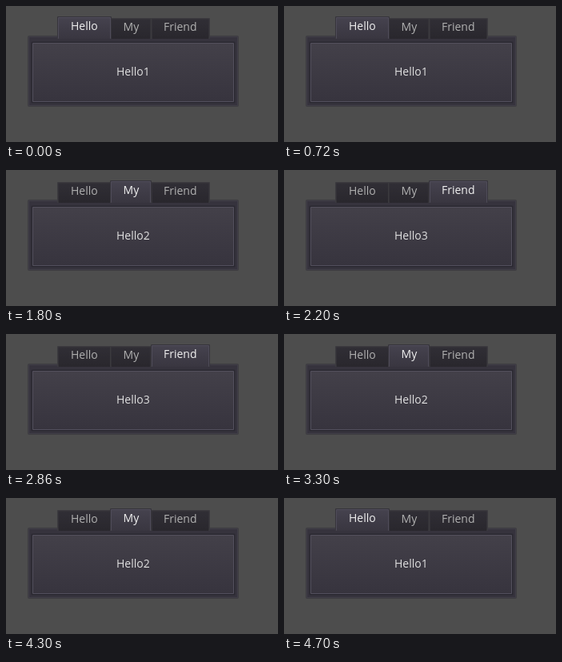
Recreate the animation shown at these times as an HTML page. Size 340x170 px, loop 5600 ms.

```html
<!DOCTYPE html>
<html lang="en">
<head>
<meta charset="utf-8">
<title>Tab container</title>
<style>
  html, body { margin: 0; width: 100%; height: 100%; overflow: hidden; background: #4d4d4d; }
  svg { display: block; width: 340px; height: 170px; }
  text { font: 14px "Open Sans", "Noto Sans", sans-serif; white-space: pre; }
  .idle { fill: #b0b0b0; }
  .active { fill: #f0f0f0; }
  .caption { fill: #e0e0e0; }
  .page, .hover { visibility: hidden; animation: 5600ms step-end infinite; }
  #page1 { animation-name: first; }
  #page2 { animation-name: second; }
  #page3 { animation-name: third; }
  .hover { animation-name: hover; }
  #page2 .caption { animation: lit 5600ms step-end infinite; }
  @keyframes first {
    0%, 83.9286% { visibility: visible; }
    21.4286% { visibility: hidden; }
    100% { visibility: visible; }
  }
  @keyframes second {
    0%, 39.2857%, 83.9286%, 100% { visibility: hidden; }
    21.4286%, 58.9286% { visibility: visible; }
  }
  @keyframes third {
    0%, 58.9286%, 100% { visibility: hidden; }
    39.2857% { visibility: visible; }
  }
  @keyframes hover {
    0%, 76.7857%, 100% { visibility: hidden; }
    67.8571% { visibility: visible; }
  }
  @keyframes lit {
    0%, 76.7857%, 100% { fill: #e0e0e0; }
    67.8571% { fill: #f0f0f0; }
  }
</style>
</head>
<body>
<svg viewBox="0 0 340 170">
  <defs>
    <linearGradient id="face" x2="0" y2="1">
      <stop stop-color="#434049"/><stop offset="1" stop-color="#37343e"/>
    </linearGradient>
    <linearGradient id="faceLit" x2="0" y2="1">
      <stop stop-color="#46434e"/><stop offset="1" stop-color="#44414c"/>
    </linearGradient>
    <linearGradient id="tabOn" x2="0" y2="1">
      <stop stop-color="#45424e"/><stop offset="1" stop-color="#393640"/>
    </linearGradient>
    <linearGradient id="tabOff" x2="0" y2="1">
      <stop stop-color="#302e35"/><stop offset="1" stop-color="#29272d"/>
    </linearGradient>
  </defs>
  <g id="panel">
    <rect x="27" y="37" width="264" height="89" rx="2" fill="#3d3c40"/>
    <rect x="28" y="38" width="262" height="87" rx="1" fill="#403e47"/>
    <rect x="29" y="39" width="260" height="85" fill="#36333d"/>
  </g>
  <g id="button">
    <rect x="31" y="44" width="256" height="78" rx="2" fill="#312f38"/>
    <rect x="32" y="45" width="254" height="76" rx="1" fill="#2a2830"/>
    <rect x="33" y="46" width="252" height="74" rx="1" fill="#53505d"/>
    <rect x="34" y="47" width="250" height="72" fill="url(#face)"/>
    <rect class="hover" x="34" y="47" width="250" height="72" fill="url(#faceLit)"/>
  </g>
  <g id="tabs"></g>
</svg>
<script>
  // label, left edge, right edge, text position
  const tabs = [
    ["Hello", 64, 132, 81],
    ["My", 130, 182, 146.6],
    ["Friend", 181, 255, 197]
  ];

  const box = (x, y, r, b, fill, rx = 0) =>
    `<rect x="${x}" y="${y}" width="${r - x}" height="${b - y}" rx="${rx}" fill="${fill}"/>`;

  const label = (x, y, kind, str) => `<text class="${kind}" x="${x}" y="${y}">${str}</text>`;

  const idleTab = ([name, l, r, x]) =>
    box(l, 15, r, 41, "#3b3a3e", 1) +
    box(l + 1, 16, r - 1, 41, "#343238", 1) +
    box(l + 2, 17, r - 2, 41, "url(#tabOff)") +
    label(x, 31, "idle", name);

  const activePage = ([name, l, r, x], i) =>
    `<g class="page" id="page${i + 1}">` +
    box(l, 13, r, 40, "#36343b", 1) +
    box(l + 1, 14, r - 1, 41, "#4f4c59", 1) +
    box(l + 2, 15, r - 2, 41, "url(#tabOn)") +
    label(x, 30, "active", name) +
    label(138, 87, "caption", "Hello" + (i + 1)) +
    "</g>";

  document.getElementById("tabs").innerHTML =
    tabs.map(idleTab).join("") + tabs.map(activePage).join("");
</script>
</body>
</html>
```
